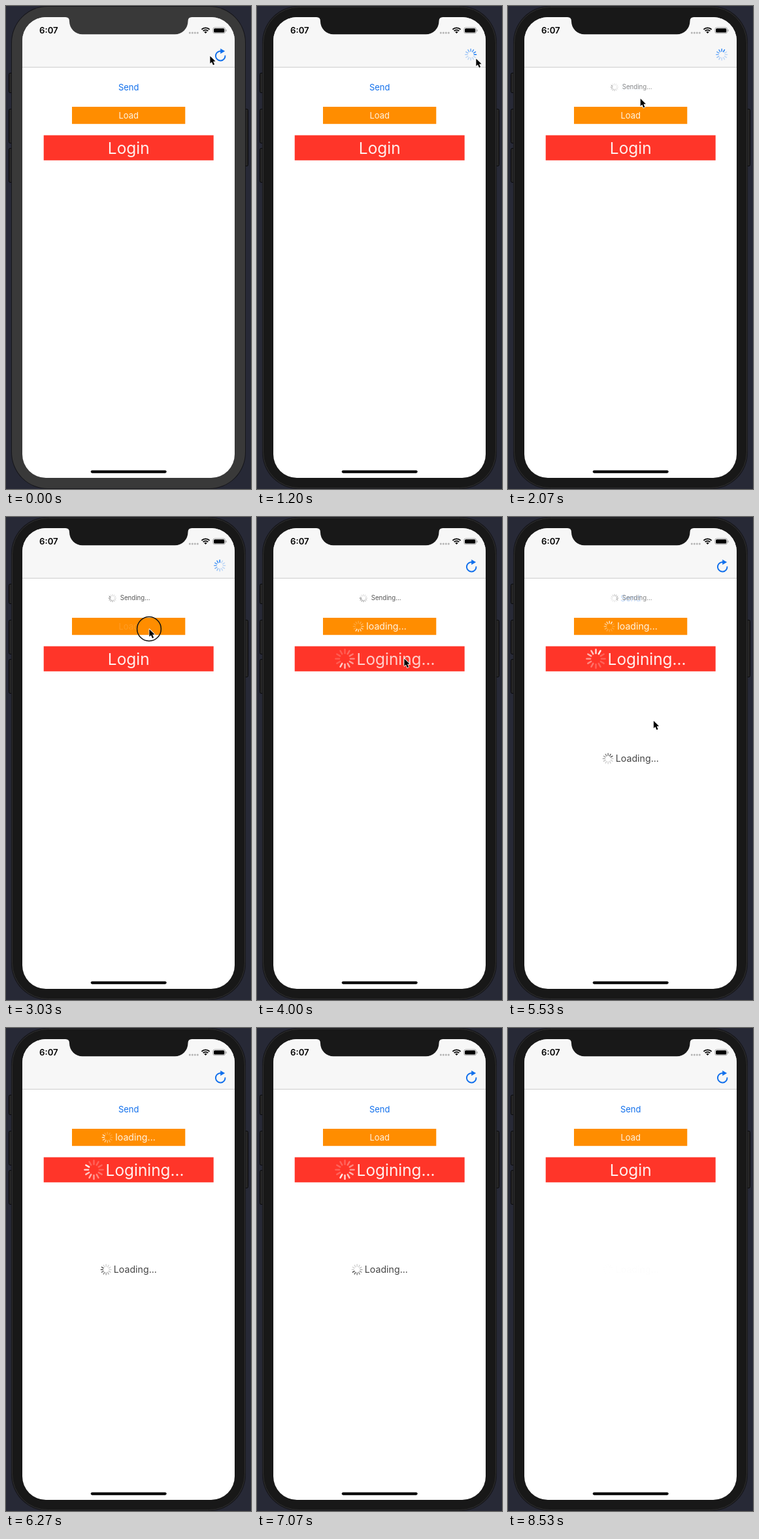
These frames come from a looping animation (375 px wide and 738 px high, 8710 ms). An HTML page with a canvas:

```html
<!DOCTYPE html>
<html lang="en">
<head>
<meta charset="utf-8">
<title>Loading buttons</title>
<style>
html, body { margin: 0; width: 100%; height: 100%; overflow: hidden; background: #272936; }
canvas { display: block; width: 375px; height: 738px; }
</style>
</head>
<body>
<canvas id="stage"></canvas>
<script>
const W = 375, H = 738, LOOP = 8710, FADE = 300;
const BLUE = '#1270ec';
const canvas = document.getElementById('stage');
const ctx = canvas.getContext('2d');
const dpr = window.devicePixelRatio || 1;
canvas.width = W * dpr;
canvas.height = H * dpr;

const clamp = v => Math.max(0, Math.min(1, v));
const smooth = v => { v = clamp(v); return v * v * (3 - 2 * v); };
const within = (t, a, b) => t >= a && t < b;

// Each busy button: idle title, busy title, spinner, press and busy times.
const buttons = [
  { title: 'Send', size: 13, color: BLUE, busy: 'Sending...', busySize: 9.7, busyColor: '#555',
    x: 187.7, y: 124, busyX: 174.7, spin: [163, 124, 6.2], head: 300, at: 3030,
    press: 1750, start: 1880, end: 5430 },
  { title: 'Load', size: 13, color: '#fff4e4', busy: 'loading...', busySize: 14.2, busyColor: '#fff4e4',
    x: 187.7, y: 167.3, busyX: 167.3, spin: [155.2, 167.2, 8.6], head: 225, at: 4000,
    box: [101, 154, 173.3, 26.2, '#ff8d00'], press: 2960, start: 3040, end: 6590 },
  { title: 'Login', size: 24.4, color: '#fff0ee', busy: 'Logining...', busySize: 24.4, busyColor: '#fff0ee',
    x: 187.7, y: 216.8, busyX: 152.6, spin: [134.5, 216.6, 15.3], head: 210, at: 4000,
    box: [57.7, 197.5, 260, 38.3, '#ff3529'], press: 3690, start: 3780, end: 7330 },
  { title: '', size: 14, color: '#444', busy: 'Loading...', busySize: 14.2, busyColor: '#444',
    x: 187.7, y: 369.3, busyX: 164.8, spin: [153.2, 369.2, 8.6], head: 60, at: 5530,
    press: 4650, start: 4650, end: 8230 }
];

const refresh = { start: 320, end: 3870 };
const touches = [[220, 330], [1750, 1870], [2950, 3080], [3680, 3790], [4380, 4480]];

// time, x, y of the pointer tip
const path = [
  [0, 312, 76], [200, 328, 77], [400, 328, 77], [900, 335, 80], [1250, 335, 80],
  [1550, 208, 152], [1720, 198, 126], [1900, 198, 126], [2400, 214, 182],
  [2800, 219, 171], [3100, 219, 171], [3630, 225, 211], [3700, 225, 216],
  [4050, 225, 216], [4330, 222, 297], [4500, 222, 297], [4800, 222.5, 311],
  [5660, 222.5, 311]
];
const EXIT = [5660, 6000];

function pointer(t) {
  if (t > EXIT[1]) return null;
  if (t > EXIT[0]) {
    const p = (t - EXIT[0]) / (EXIT[1] - EXIT[0]), q = 1 - p;
    const mix = (a, b, c, d) => q * q * q * a + 3 * q * q * p * b + 3 * q * p * p * c + p * p * p * d;
    return [mix(222.5, 400, 370, 31), mix(311, 250, 110, 70)];
  }
  let i = 1;
  while (i < path.length - 1 && path[i][0] < t) i++;
  const a = path[i - 1], b = path[i];
  const k = smooth((t - a[0]) / (b[0] - a[0]));
  return [a[1] + (b[1] - a[1]) * k, a[2] + (b[2] - a[2]) * k];
}

function round(x, y, w, h, r, fill, stroke, width = 1) {
  ctx.beginPath();
  ctx.roundRect(x, y, w, h, r);
  if (fill) { ctx.fillStyle = fill; ctx.fill(); }
  if (stroke) { ctx.strokeStyle = stroke; ctx.lineWidth = width; ctx.stroke(); }
}

function poly(points, fill) {
  ctx.beginPath();
  points.forEach(([x, y]) => ctx.lineTo(x, y));
  ctx.closePath();
  ctx.fillStyle = fill;
  ctx.fill();
}

function text(str, x, y, size, color, align, weight = 400) {
  ctx.font = `${weight} ${size}px Inter, Roboto, sans-serif`;
  ctx.textAlign = align;
  ctx.textBaseline = 'alphabetic';
  ctx.fillStyle = color;
  ctx.fillText(str, x, y + size * 0.36);
}

function spinner([x, y, r], head, color, alpha) {
  ctx.save();
  ctx.translate(x, y);
  ctx.strokeStyle = color;
  ctx.lineCap = 'round';
  ctx.lineWidth = r * 0.16;
  const lead = Math.floor(head / 30);
  for (let i = 0; i < 12; i++) {
    const age = (((lead - i) % 12) + 12) % 12;
    const a = i * Math.PI / 6, sx = Math.sin(a), sy = -Math.cos(a);
    ctx.globalAlpha = alpha * Math.max(0.25, 1 - age * 0.11);
    ctx.beginPath();
    ctx.moveTo(sx * r * 0.55, sy * r * 0.55);
    ctx.lineTo(sx * r * 0.92, sy * r * 0.92);
    ctx.stroke();
  }
  ctx.restore();
}

function drawButton(b, t) {
  if (b.box) {
    ctx.fillStyle = b.box[4];
    ctx.fillRect(...b.box.slice(0, 4));
  }
  let busy = smooth((t - b.start) / FADE);
  if (t > b.end) busy = 1 - smooth((t - b.end) / FADE);
  // the last trace of the overlay lingers until the loop restarts
  if (!b.title && t > b.end) busy = Math.max(busy, 0.012);
  let idle = 1 - busy;
  if (within(t, b.press, b.start + FADE)) idle *= 1 - 0.85 * clamp((t - b.press) / 40);
  if (idle > 0 && b.title) {
    ctx.globalAlpha = idle;
    text(b.title, b.x, b.y, b.size, b.color, 'center');
  }
  if (busy > 0) {
    ctx.globalAlpha = busy;
    text(b.busy, b.busyX, b.y, b.busySize, b.busyColor, 'left');
    spinner(b.spin, b.head + (t - b.at) * 0.36, b.busyColor, busy);
  }
  ctx.globalAlpha = 1;
}

function drawDevice(active) {
  ctx.fillStyle = '#272936';
  ctx.fillRect(0, 0, W, H);
  [[102, 31], [157, 53], [217, 53]].forEach(([y, h]) =>
    round(4.5, y + 0.5, 8, h - 1, 2, '#262626', '#08080a'));
  round(362.5, 157.5, 8, 87, 2, '#262626', '#08080a');
  round(8, 0, 359, 738, 56, '#16161a');
  if (active) round(9.5, 1.5, 356, 735, 55, '#181818', '#303030');
  else round(9, 1, 357, 736, 55, '#393939');
}

function drawScreen(bezel) {
  ctx.save();
  ctx.beginPath();
  ctx.roundRect(25, 17, 325, 704, 36);
  ctx.clip();
  ctx.fillStyle = '#fff';
  ctx.fillRect(25, 17, 325, 704);
  ctx.fillStyle = '#f7f7f7';
  ctx.fillRect(25, 17, 325, 76.3);
  ctx.fillStyle = '#c8c8c8';
  ctx.fillRect(25, 93.2, 325, 0.9);
  ctx.restore();

  // notch
  ctx.beginPath();
  ctx.moveTo(91, 16);
  ctx.lineTo(91, 17);
  ctx.quadraticCurveTo(97, 17, 97, 23);
  ctx.arcTo(97, 43.3, 118, 43.3, 20);
  ctx.arcTo(278.5, 43.3, 278.5, 23, 20);
  ctx.lineTo(278.5, 23);
  ctx.quadraticCurveTo(278.5, 17, 284.5, 17);
  ctx.lineTo(284.5, 16);
  ctx.fillStyle = bezel;
  ctx.fill();
  round(129.7, 709.4, 116, 4.3, 2.1, '#000');
}

function drawStatus() {
  text('6:07', 51, 37.4, 13.2, '#000', 'left', 600);
  ctx.fillStyle = '#b4b4b4';
  for (let i = 0; i < 4; i++) {
    ctx.beginPath();
    ctx.arc(281.3 + i * 4, 41, 1.5, 0, 7);
    ctx.fill();
  }
  // wifi
  const cx = 305.5, cy = 42;
  ctx.strokeStyle = '#000';
  ctx.lineWidth = 1.9;
  [8.6, 5.4].forEach(r => {
    ctx.beginPath();
    ctx.arc(cx, cy, r, -Math.PI * 0.75, -Math.PI * 0.25);
    ctx.stroke();
  });
  ctx.beginPath();
  ctx.moveTo(cx, cy);
  ctx.arc(cx, cy, 3.1, -Math.PI * 0.75, -Math.PI * 0.25);
  ctx.fillStyle = '#000';
  ctx.fill();
  // battery
  round(316.8, 32.9, 18.8, 8.8, 2.6, null, '#a0a0a0', 0.9);
  round(318.1, 34.2, 16.2, 6.2, 1.5, '#000');
  round(336.4, 35.8, 1.2, 3.2, 0.6, '#a0a0a0');
}

function drawRefresh(t) {
  if (within(t, refresh.start, refresh.end)) {
    spinner([327.2, 74.3, 9.2], 90 + (t - 1200) * 0.36, '#1478f5', 1);
    return;
  }
  ctx.strokeStyle = BLUE;
  ctx.lineWidth = 1.9;
  ctx.lineCap = 'butt';
  ctx.beginPath();
  ctx.arc(328.2, 76.2, 7.3, -0.1, Math.PI * 1.55);
  ctx.stroke();
  poly([[328.2, 65], [335.2, 69], [328.2, 73]], BLUE);
}

function drawPointer(t) {
  const p = pointer(t);
  if (!p) return;
  ctx.save();
  ctx.translate(p[0], p[1]);
  if (touches.some(([a, b]) => within(t, a, b))) {
    ctx.beginPath();
    ctx.arc(0, 0, 18.4, 0, 7);
    ctx.strokeStyle = '#111';
    ctx.lineWidth = 1.5;
    ctx.stroke();
  }
  const arrow = [[0.4, 0.4], [0.4, 11.8], [3, 9.4], [5, 14.2], [7.1, 13.3], [5.1, 8.7], [8.6, 8.5]];
  ctx.beginPath();
  arrow.forEach(([x, y]) => ctx.lineTo(x, y));
  ctx.closePath();
  ctx.strokeStyle = '#fff';
  ctx.lineWidth = 1.6;
  ctx.lineJoin = 'round';
  ctx.stroke();
  ctx.fillStyle = '#000';
  ctx.fill();
  ctx.restore();
}

function draw(t) {
  const active = t >= 220;
  ctx.setTransform(dpr, 0, 0, dpr, 0, 0);
  drawDevice(active);
  drawScreen(active ? '#181818' : '#393939');
  drawStatus();
  drawRefresh(t);
  buttons.forEach(b => drawButton(b, t));
  drawPointer(t);
}

const begin = performance.now();
function tick() {
  draw((performance.now() - begin) % LOOP);
  requestAnimationFrame(tick);
}
tick();
</script>
</body>
</html>
```
